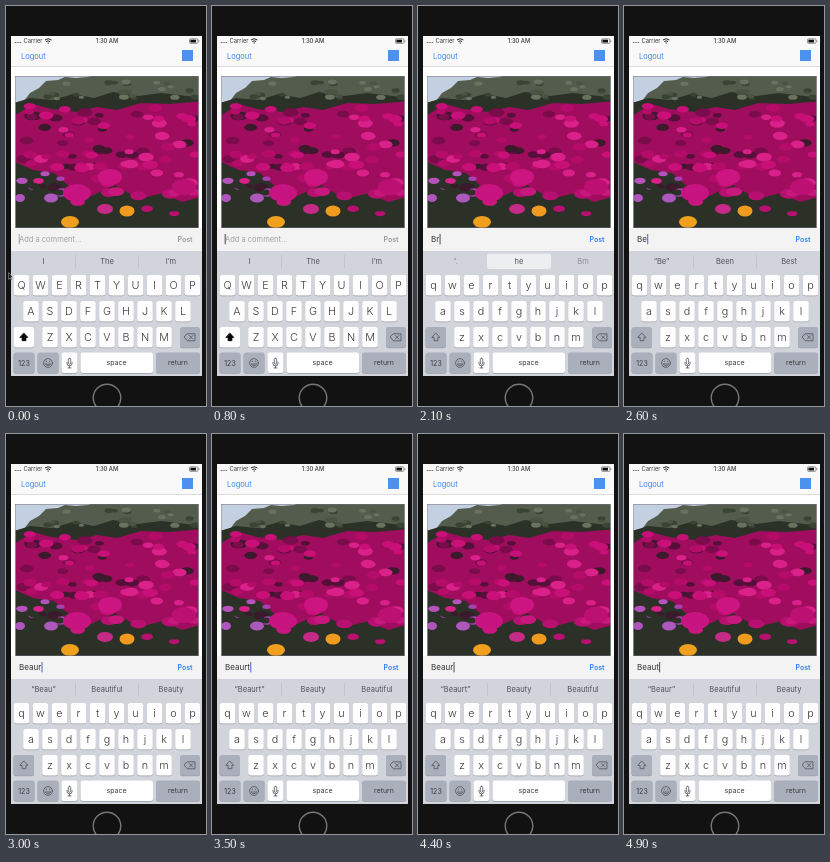
These frames come from a looping animation (200 px wide and 400 px high, 5000 ms). An HTML page:

```html
<!DOCTYPE html>
<html lang="en">
<head>
<meta charset="utf-8">
<title>Comment typing</title>
<style>
  html, body { margin: 0; width: 100%; height: 100%; overflow: hidden; background: #111; }
  svg { display: block; width: 100vw; height: 100vh; }
  text { font-family: Inter, Roboto, sans-serif; font-size: 7.5px; fill: #3a3a3c; }
  .mid { text-anchor: middle; }
  .key { fill: #fefefe; }
  .dark { fill: #a9b0bb; }
  .letter { font-size: 10.8px; font-weight: 300; }
  .small { font-size: 7px; }
  .bar { font-size: 5.8px; }
  .line { fill: none; stroke: #505359; stroke-width: .8; stroke-linejoin: round; stroke-linecap: round; }
  .hint { fill: #50545a; }
  #soft { filter: blur(.7px); }
</style>
</head>
<body>
<svg viewBox="0 0 200 400" preserveAspectRatio="none">
  <defs><clipPath id="frame"><rect x="9.5" y="70" width="183" height="152"/></clipPath></defs>
  <rect width="200" height="400" fill="#121212"/>
  <circle cx="101" cy="392" r="13.8" fill="#111" stroke="#777" stroke-width="1.4"/>

  <rect x="5" y="30" width="191" height="340" fill="#fff"/>
  <rect x="5" y="30" width="191" height="30.5" fill="#f9f9f9"/>
  <path d="M5 60.5H196" stroke="#c8c8ca" stroke-width=".6"/>

  <path d="M8.8 36.5H16" stroke="#555" stroke-width="1" stroke-dasharray="1 .8"/>
  <text class="bar" x="17.5" y="37.2">Carrier</text>
  <g fill="none" stroke="#222" stroke-width="1">
    <path d="M39 34q3.2-2.6 6.4 0M40.3 35.6q1.9-1.5 3.8 0"/>
    <path d="M41.6 37h1.2"/>
  </g>
  <text class="bar mid" x="101" y="37.2" font-weight="500">1:30 AM</text>
  <rect x="183.5" y="32.8" width="8.4" height="4.6" rx="1" fill="none" stroke="#555" stroke-width=".6"/>
  <rect x="184.4" y="33.7" width="5.6" height="2.8" fill="#111"/>
  <path d="M192.8 34.3v1.6" stroke="#555" stroke-width=".7"/>
  <text x="15" y="52.7" style="fill:#3f86ee">Logout</text>
  <rect x="176" y="44" width="11" height="11" fill="#4c91ee"/>

  <g clip-path="url(#frame)">
    <rect x="9" y="70" width="185" height="153" fill="#c3d0e2"/>
    <g id="soft">
      <path d="M5 97L18 95 24 87 33 82 40 75 52 74 59 71 70 72 82 71 91 68H198V140H5Z" fill="#535c4d"/>
      <path d="M5 98L24 92 46 94 67 88 88 92 107 86 132 90 155 87 198 92V227H5Z" fill="#2b3127"/>
      <path d="M5 112L27 98 45 103 71 106 91 101 111 104 135 97 163 98 198 95V190L176 196 157 187 133 193 109 179 85 190 64 181 48 167 27 164 5 154Z" fill="#a00d5e"/>
    </g>
  </g>
  <rect x="9.5" y="70.5" width="183" height="151" fill="none" stroke="#77717a" stroke-width=".5"/>

  <rect x="5" y="222" width="191" height="23" fill="#f3f3f4"/>
  <text id="field" x="13" y="236"></text>
  <rect id="caret" y="228" width="1" height="10.3" fill="#47506a"/>
  <text id="post" class="small mid" x="179" y="236" font-weight="600">Post</text>

  <rect x="5" y="245" width="191" height="125" fill="#d1d4da"/>
  <rect id="pick" x="69" y="247.5" width="64" height="15.5" rx="2.5" fill="#eceef0"/>
  <path id="rules" d="M69.5 249V262M132.5 249V262" stroke="#b7bbc2" stroke-width=".6"/>
  <text class="mid hint" x="37.5" y="258"></text>
  <text class="mid hint" x="101" y="258"></text>
  <text class="mid hint" x="165" y="258"></text>

  <g id="keys"></g>
  <path id="shift" class="line" d="M18 327.2L21.8 331.4H19.9V334.7H16.1V331.4H14.2Z"/>
  <path class="line" d="M181.4 327.8H189V334.8H181.4L178.4 331.3ZM183.4 329.6L186.8 333M186.8 329.6L183.4 333"/>
  <g class="line">
    <circle cx="42" cy="357" r="4.4"/>
    <path d="M39.4 358.3q2.6 3.3 5.2 0ZM40.4 355.2v.5M43.6 355.2v.5"/>
    <path d="M61 356.3v1.2q0 2.4 2.5 2.4t2.5-2.4v-1.2M63.5 360v1.8M62 361.9h3"/>
    <rect x="62.3" y="352.3" width="2.4" height="6" rx="1.2"/>
  </g>
  <text class="small mid" x="18" y="359.5">123</text>
  <text class="small mid" x="110.5" y="359.3">space</text>
  <text class="small mid" x="172" y="359.3">return</text>

  <path id="mouse" d="M2.6 266.5V273.5L4.2 272 5.3 274.3 6.3 273.8 5.3 271.6H7.4Z" fill="#222" stroke="#ddd" stroke-width=".5"/>
</svg>
<script>
const $ = id => document.getElementById(id);

function add(parent, tag, attrs, label) {
  const el = document.createElementNS('http://www.w3.org/2000/svg', tag);
  for (const name in attrs) el.setAttribute(name, attrs[name]);
  if (label) el.textContent = label;
  return parent.appendChild(el);
}

// Flat blossoms
let seed = 17;
const rnd = () => (seed = seed * 16807 % 2147483647) / 2147483647;

function blobs(count, x, y, w, h, r, colors) {
  for (let i = 0; i < count; i++) {
    const size = r * (0.7 + rnd() * 0.6);
    add($('soft'), 'ellipse', {
      cx: x + rnd() * w, cy: y + rnd() * h, rx: size, ry: size * 0.55,
      fill: colors[i % colors.length]
    });
  }
}

blobs(26, 40, 76, 150, 18, 4, ['#69725f', '#3a4434', '#4a5443']);
blobs(30, 12, 104, 178, 80, 6, ['#55103a', '#3b1a2c', '#7a0c4b']);
blobs(50, 22, 99, 168, 82, 6, ['#c81078', '#b50c6a', '#da2089']);
blobs(14, 60, 178, 130, 30, 7, ['#b81070', '#2b3127', '#c8187e']);
blobs(10, 12, 162, 55, 30, 4.5, ['#a544b0', '#2b3127', '#b553bd']);
for (const [x, y, rx, ry, fill] of [
  [71, 187, 14, 9, '#c81480'], [99, 203, 8, 5, '#c42a86'], [104, 171, 12, 8, '#cc1580'],
  [178, 181, 12, 8, '#bd1073'], [45, 192, 7, 4.5, '#ad58bd'], [14, 192, 5, 4, '#b055bd'],
  [64, 216, 9, 6, '#f0a01d'], [121, 205, 7.5, 5.5, '#f09a20']
]) add($('soft'), 'ellipse', { cx: x, cy: y, rx, ry, fill });

// Keyboard
function key(x, y, w, cls = 'key') {
  add($('keys'), 'rect', { x, y: y + 0.7, width: w, height: 20.5, rx: 2.5, fill: '#9b9fa6' });
  return add($('keys'), 'rect', { x, y, width: w, height: 20.5, rx: 2.5, class: cls });
}

const letters = [];
[['QWERTYUIOP', 15.5, 269], ['ASDFGHJKL', 25, 295], ['ZXCVBNM', 44, 321]].forEach(([row, x, y]) => {
  [...row].forEach((c, i) => {
    const cx = x + i * 19;
    key(cx - 7.8, y, 15.6);
    letters.push(add($('keys'), 'text', { x: cx, y: y + 14, class: 'letter mid' }, c));
  });
});
const shiftKey = key(7.5, 321, 20.5);
key(174, 321, 20, 'dark');
key(7.5, 346.5, 21, 'dark');
key(31.5, 346.5, 21, 'dark');
key(55.5, 346.5, 16);
key(74.5, 346.5, 72.5);
key(150, 346.5, 44, 'dark');

const typed = [
  [0, ''], [1900, 'B'], [2100, 'Br'], [2300, 'B'], [2500, 'Be'], [2700, 'Bea'],
  [2800, 'Beau'], [3000, 'Beaur'], [3300, 'Beaurt'], [4400, 'Beaur'], [4700, 'Beau'], [4900, 'Beaut']
];
const offers = [
  [0, 'I', 'The', 'I’m'], [2000, '“.', 'he', 'Bm'], [2200, '“Br”', 'Be', 'But'],
  [2600, '“Be”', 'Been', 'Best'], [2800, '“Bea”', 'Beat', 'Beautiful'],
  [2900, '“Beau”', 'Beautiful', 'Beauty'], [3200, '“Beaur”', 'Beautiful', 'Beauty'],
  [3500, '“Beaurt”', 'Beauty', 'Beautiful'], [4600, '“Beaur”', 'Beautiful', 'Beauty']
];
const at = (list, t) => list.filter(item => item[0] <= t).pop();
const hints = document.querySelectorAll('.hint');
const start = performance.now();
let last = -1;

function draw(t) {
  const [since, word] = at(typed, t);
  const [from, ...words] = at(offers, t);
  const empty = !word, picked = from === 2000;
  const field = $('field');

  field.textContent = word || 'Add a comment...';
  field.style.fontSize = empty ? '7.5px' : '8px';
  field.style.fill = empty ? '#a0a0a3' : '#333';
  $('caret').setAttribute('x', empty ? 12.7 : 13.3 + field.getComputedTextLength());
  const phase = empty ? t % 1000 : (t - since + 500) % 1000;
  $('caret').style.opacity = phase === 0 ? 0.45 : phase < 500 && (empty || t - since >= 500) ? 0 : 1;
  $('caret').style.fill = t >= 2500 && t < 4400 ? '#496bc5' : '#454b59';
  $('post').style.fill = empty ? '#98989c' : '#2f7df0';

  hints.forEach((hint, i) => {
    hint.textContent = words[i];
    hint.style.opacity = picked && i !== 1 ? 0.55 : 1;
  });
  $('pick').style.opacity = picked ? 1 : 0;
  $('rules').style.opacity = picked ? 0 : 1;

  for (const el of letters) {
    el.textContent = empty ? el.textContent.toUpperCase() : el.textContent.toLowerCase();
  }
  shiftKey.setAttribute('class', empty ? 'key' : 'dark');
  $('shift').style.fill = empty ? '#000' : 'none';
  $('shift').style.stroke = empty ? '#000' : '#505359';
  $('mouse').style.opacity = t < 100 ? 0.8 : 0;
}

function tick() {
  const t = Math.floor((performance.now() - start) % 5000 / 100) * 100;
  if (t !== last) draw(last = t);
  requestAnimationFrame(tick);
}
tick();
</script>
</body>
</html>
```
